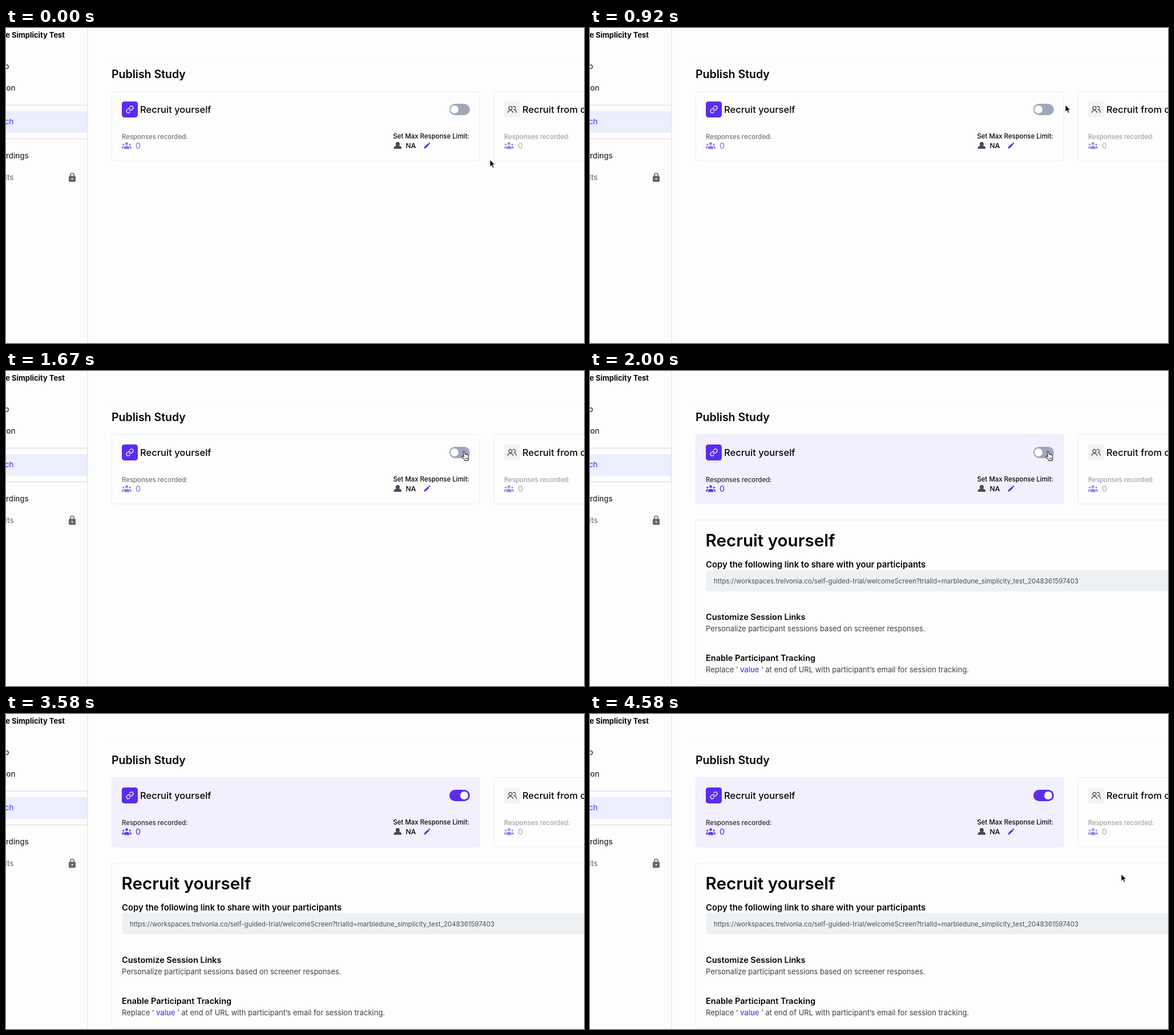
Recreate the animation shown at these times as an HTML page. Size 1013 by 553 pixels, loop 4750 ms.

```html
<!DOCTYPE html>
<html lang="en">
<head>
<meta charset="utf-8">
<title>Publish a study</title>
<style>
  html, body { margin: 0; width: 100%; height: 100%; overflow: hidden; background: #fdfdfd; }
  svg { display: block; width: 100%; height: 100%; }
  text { font-family: Inter, "Open Sans", sans-serif; font-optical-sizing: none; font-weight: 500; fill: #050505; white-space: pre; }
  .nav { font-size: 13.2px; text-anchor: end; fill: #2c2c2e; }
  .title { font-size: 16.5px; }
  .label { font-size: 11.4px; }
  .count { font-size: 14px; }
  .head { font-size: 14.5px; font-weight: 600; }
  .body { font-size: 12.9px; font-weight: 400; fill: #404046; }
  .muted { fill: #a3a3a8; }
  .line { fill: none; stroke: #ebebef; }
</style>
</head>
<body>
<svg viewBox="0 0 1013 553">
  <defs>
    <g id="group">
      <circle cx="8.5" cy="3" r="2.4"/><circle cx="2.8" cy="4.6" r="1.6"/><circle cx="14.2" cy="4.6" r="1.6"/>
      <path d="M4 12.5v-1.8a4.5 3.7 0 0 1 9 0v1.8zM0 11.5v-1.3a2.9 2.7 0 0 1 4.2-2.4q-1.4 1.4-1.4 3.7zM17 11.5v-1.3a2.9 2.7 0 0 0-4.2-2.4q1.4 1.4 1.4 3.7z"/>
    </g>
  </defs>

  <!-- Sidebar -->
  <rect y="146" width="142" height="38" fill="#ebeefd"/>
  <path d="M143 0V553M0 135.5H142M0 194.5H142" fill="none" stroke="#e1e1e5" stroke-width="1.3"/>
  <text class="nav" x="103" y="16.5" style="font-size:12.9px;font-weight:700;fill:#050505">e Simplicity Test</text>
  <text class="nav" x="5.5" y="72">p</text>
  <text class="nav" x="16.5" y="109.5">on</text>
  <text class="nav" x="13.5" y="169" style="fill:#6a45e4">ch</text>
  <text class="nav" x="39.5" y="229">rdings</text>
  <text class="nav" x="13.5" y="267" style="fill:#7d7d82">lts</text>
  <g fill="#666669">
    <path d="M112.9 260v-2.2a3.1 3.1 0 0 1 6.2 0v2.2" fill="none" stroke="#666669" stroke-width="1.6"/>
    <rect x="110" y="259.5" width="12" height="10.5" rx="1.5"/>
    <circle cx="116" cy="264.8" r="1.4" fill="#fdfdfd"/>
  </g>

  <text x="185" y="88" style="font-size:19.5px;font-weight:600">Publish Study</text>
  <path d="M185 51.5H1013" stroke="#f9f9fa"/>

  <!-- Own recruiting card -->
  <rect id="card" class="line" x="185.5" y="111.5" width="645" height="122" rx="3"/>
  <rect x="203" y="129" width="28" height="28" rx="4.5" fill="#5b2cee"/>
  <g transform="translate(209.8 135.8) scale(.6)" fill="none" stroke="#fff" stroke-width="2.1" stroke-linecap="round">
    <path d="M10 13a5 5 0 0 0 7.54.54l3-3a5 5 0 0 0-7.07-7.07l-1.72 1.71M14 11a5 5 0 0 0-7.54-.54l-3 3a5 5 0 0 0 7.07 7.07l1.71-1.71"/>
  </g>
  <text class="title" x="235" y="149">Recruit yourself</text>
  <text id="label" class="label" x="203" y="194.5">Responses recorded:</text>
  <g id="tally">
    <use href="#group" x="203" y="200"/>
    <text class="count" x="227" y="211.5" style="fill:inherit">0</text>
  </g>
  <text class="label" x="678.5" y="194">Set Max Response Limit:</text>
  <path d="M686.5 200a3.6 3.6 0 0 1 2.3 6.4q4.2 1 4.4 4.2v1.4h-13.4v-1.4q.2-3.2 4.4-4.2a3.6 3.6 0 0 1 2.3-6.4z" fill="#4b475a"/>
  <text x="700.5" y="211.3" style="font-size:12.3px">NA</text>
  <path transform="translate(731 199) scale(.6)" fill="#5b2cee" d="M3 17.25V21h3.75L17.81 9.94l-3.75-3.75zM20.71 7.04a1 1 0 0 0 0-1.41l-2.34-2.34a1 1 0 0 0-1.41 0l-1.83 1.83 3.75 3.75z"/>
  <rect id="track" x="777" y="133" width="36" height="20" rx="10"/>
  <circle id="knob" cy="143" r="7" fill="#fff"/>

  <!-- Second card, cut by the stage edge -->
  <rect class="line" x="855.5" y="111.5" width="645" height="122" rx="3"/>
  <rect x="873" y="129" width="28" height="28" rx="4.5" fill="#f3f3f4"/>
  <g fill="none" stroke="#4a4a50" stroke-width="1.3" stroke-linecap="round">
    <circle cx="884" cy="140.5" r="2.9"/>
    <path d="M879.2 148.5a4.9 4.6 0 0 1 9.6 0M888.8 137.8a2.9 2.9 0 1 1 1 5.5q4.2.3 4.8 5.2"/>
  </g>
  <text class="title" x="905" y="149">Recruit from o</text>
  <text class="label muted" x="873" y="194.5">Responses recorded:</text>
  <use href="#group" x="873" y="200" fill="#9a83f1"/>
  <text class="count" x="897" y="211.5" style="fill:#b8b8bc">0</text>

  <!-- Details panel -->
  <g id="panel">
    <rect class="line" x="185.5" y="261.5" width="900" height="289" rx="3"/>
    <text x="202.5" y="308" style="font-size:29.6px;font-weight:600">Recruit yourself</text>
    <text class="head" x="203" y="345" style="font-size:14.85px">Copy the following link to share with your participants</text>
    <rect x="203" y="349.5" width="850" height="37.5" rx="5" fill="#eef1f4"/>
    <text x="217" y="373" style="font-size:11.5px;font-weight:400;fill:#4c4e53">https://workspaces.trelvonia.co/self-guided-trial/welcomeScreen?trialId=marbledune_simplicity_test_2048361597403</text>
    <text class="head" x="203" y="436.5">Customize Session Links</text>
    <text class="body" x="203" y="456.5">Personalize participant sessions based on screener responses.</text>
    <text class="head" x="203" y="509">Enable Participant Tracking</text>
    <text class="body" x="203" y="529" style="font-size:13.03px">Replace ’ <tspan fill="#6537e6" font-weight="500">value</tspan> ’ at end of URL with participant’s email for session tracking.</text>
  </g>

  <!-- Pointers, with the hot spot at 0,0 -->
  <path id="arrow" d="M0 0V12.5L2.9 9.9L5 14.6L7.2 13.6L5.1 9.1H9z" fill="#111" stroke="#fff" stroke-width=".9"/>
  <g id="hand" fill="#fff" stroke="#222" stroke-width="1.1" stroke-linejoin="round">
    <path d="M2.2 1.3Q2.4 0 3.5.3T5 2L6 5.5Q7 4.7 8 5.7Q9.2 5.2 9.9 6.5Q11.4 6.3 11.7 8L12 11.5Q11.8 13.5 10.8 14.5V16.5H5V15L.7 10.3Q-.5 8.7 1 8.2Q2 8 3.6 9.5z"/>
    <path d="M6.3 11v3M8.1 11v3M9.8 11v3" stroke-width=".8"/>
  </g>
</svg>
<script>
  const LOOP = 4750, STEP = 1000 / 12;
  const $ = id => document.getElementById(id);
  const set = (id, attrs) => Object.entries(attrs).forEach(([k, v]) => $(id).setAttribute(k, v));
  const show = (id, on) => set(id, { visibility: on ? "visible" : "hidden" });
  const lerp = (a, b, p) => a + (b - a) * p;
  const smooth = p => p * p * (3 - 2 * p);

  // Pointer stops: step, x, y
  const stops = [
    [0, 848, 231], [4, 511, 258], [5, 511, 258], [11, 833, 135], [12, 813, 139],
    [15, 799, 141], [46, 799, 141], [47, 835, 208], [48, 888, 300], [51, 888, 300], [55, 931, 281]
  ];
  const OPEN = 24, SWITCHED = 28, LEAVE = 43, RETURN = 47, HOVER = 13;

  function pointerAt(step) {
    const i = stops.findIndex(s => s[0] > step);
    if (i < 0) return stops[stops.length - 1].slice(1);
    const [a, b] = [stops[i - 1], stops[i]];
    const p = smooth((step - a[0]) / (b[0] - a[0]));
    return [lerp(a[1], b[1], p), lerp(a[2], b[2], p)];
  }

  function mix(from, to, p) {
    return `rgb(${from.map((c, i) => Math.round(lerp(c, to[i], p)))})`;
  }

  function draw(time) {
    const step = Math.floor((time % LOOP + 4) / STEP);
    const open = step >= OPEN;
    const on = smooth(Math.min(1, Math.max(0, (step - OPEN) / (SWITCHED - OPEN))));

    show("panel", open);
    $("card").style.fill = open ? "#f2effe" : "none";
    $("label").style.fill = open ? "#2c2b33" : "#77777c";
    set("tally", { fill: open ? "#6539e8" : "#8f76ee" });
    set("track", { fill: mix([159, 167, 187], [91, 44, 238], on) });
    set("knob", { cx: lerp(786, 803, on) });

    const hovering = step >= HOVER && step < LEAVE;
    const place = { transform: `translate(${pointerAt(step)})` };
    set("arrow", place);
    set("hand", place);
    show("hand", hovering);
    show("arrow", step < HOVER || step >= RETURN);
  }

  function tick() {
    draw(performance.now());
    requestAnimationFrame(tick);
  }
  tick();
</script>
</body>
</html>
```
